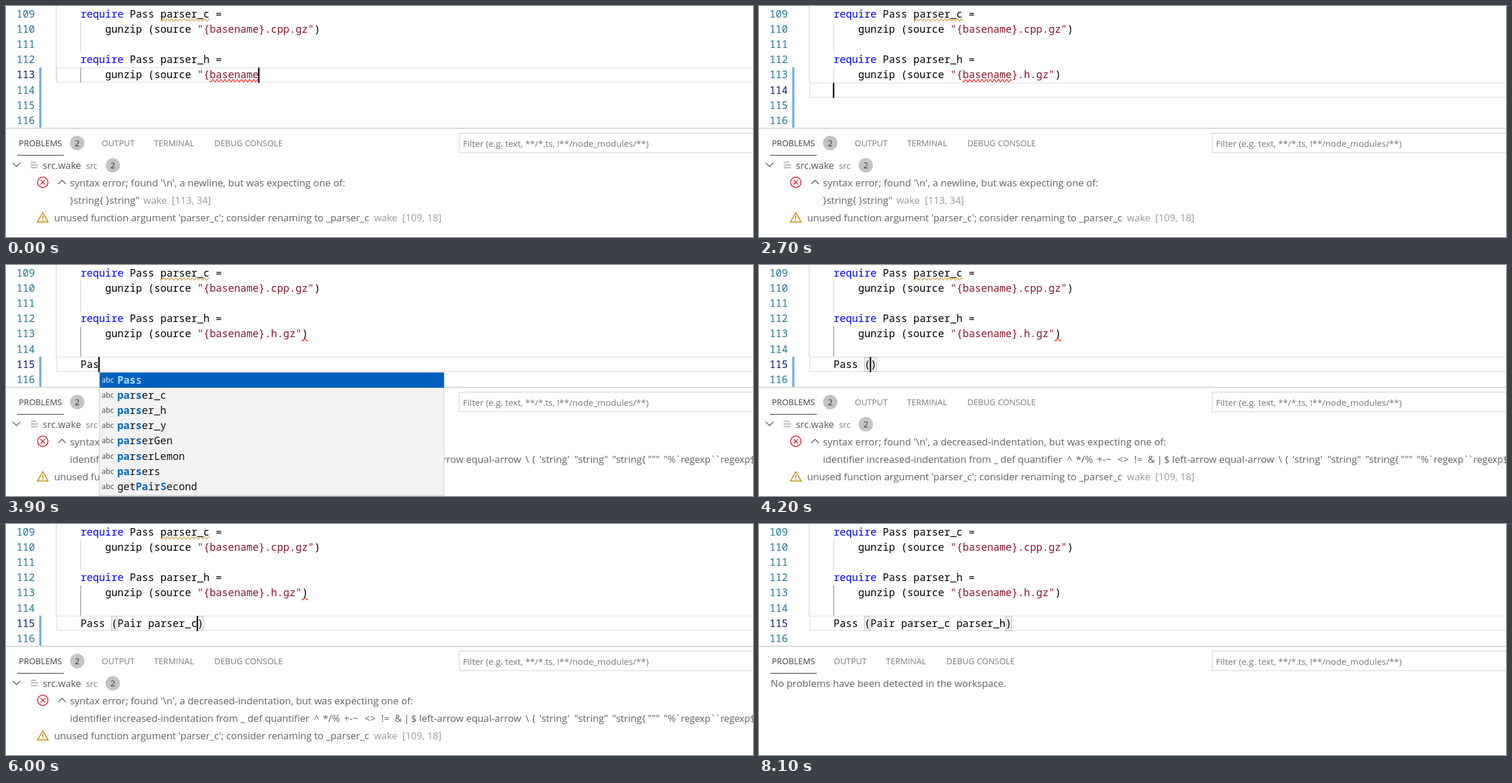
Recreate the animation shown at these times as an HTML page. Size 1280 by 397 pixels, loop 8.4 s.

```html
<!DOCTYPE html>
<html lang="en">
<head>
<meta charset="utf-8">
<title>Editor typing</title>
<style>
  html, body { margin: 0; width: 100%; height: 100%; overflow: hidden; background: #fff; }
  svg { display: block; width: 100vw; height: 100vh; }
  text { white-space: pre; font-family: "Open Sans", "Noto Sans", sans-serif; font-size: 16.75px; fill: #616161; }
  text.code { font-family: "Noto Sans Mono", "DejaVu Sans Mono", monospace; font-size: 17.55px; fill: #000; }
</style>
</head>
<body>
<svg id="stage" viewBox="0 0 1280 397" preserveAspectRatio="none"></svg>
<script>
const STEP = 300, LOOP = 8400;
const CHAR = 10.53, ROW = 26.1, LEFT = 127.8, FIRST = 109;
const stage = document.getElementById('stage');

const esc = s => s.replace(/&/g, '&amp;').replace(/</g, '&lt;').replace(/>/g, '&gt;');
const rowTop = n => 1 + (n - FIRST) * ROW;
const colX = c => LEFT + c * CHAR;

const text = (x, y, s, fill = '#616161', size = 16.75, more = '') =>
  `<text x="${x}" y="${y}" style="fill:${fill};font-size:${size}px" ${more}>${esc(s)}</text>`;
const mono = (x, y, s, fill = '#000', bold = false) =>
  `<text class="code" x="${x}" y="${y}" style="fill:${fill};font-weight:${bold ? 700 : 400}">${esc(s)}</text>`;
const rect = (x, y, w, h, fill, more = '') =>
  `<rect x="${x}" y="${y}" width="${w}" height="${h}" fill="${fill}" ${more}/>`;
const line = (d, color, width = 1.3) =>
  `<path d="${d}" fill="none" stroke="${color}" stroke-width="${width}"/>`;
const code = (n, col, s, fill) => mono(colX(col), rowTop(n) + 19, s, fill);

function squiggle(col, len, n, color) {
  let d = `M${colX(col)} ${rowTop(n) + 23}`;
  const half = 3.51;
  for (let i = 0; i < Math.round(len * CHAR / half); i++) d += `q${half / 2} ${i % 2 ? -4 : 4} ${half} 0`;
  return line(d, color, 1.2);
}

// [start ms, changed values]
const steps = [
  [0, { tail: '', last: '', row: 113, error: 'newline', popup: false, bar: 113, typing: false, blink: true }],
  [300, { tail: '}' }],
  [600, { tail: '}.' }],
  [900, { tail: '}.h' }],
  [1200, { tail: '}.h.' }],
  [1500, { tail: '}.h.g' }],
  [1800, { tail: '}.h.gz' }],
  [2100, { tail: '}.h.gz"' }],
  [2400, { tail: '}.h.gz")' }],
  [2700, { row: 114 }],
  [3000, { row: 115, bar: 115, error: 'indent' }],
  [3600, { last: 'P', typing: true }],
  [3900, { last: 'Pas', popup: true }],
  [4200, { last: 'Pass (', popup: false }],
  [4500, { last: 'Pass (Pai' }],
  [4800, { last: 'Pass (Pair ' }],
  [5100, { last: 'Pass (Pair pa' }],
  [5400, { last: 'Pass (Pair pars' }],
  [5700, { last: 'Pass (Pair parser' }],
  [6000, { last: 'Pass (Pair parser_c' }],
  [6300, { last: 'Pass (Pair parser_c ' }],
  [6600, { last: 'Pass (Pair parser_c pa' }],
  [6900, { last: 'Pass (Pair parser_c pars' }],
  [7200, { last: 'Pass (Pair parser_c parser' }],
  [7500, { last: 'Pass (Pair parser_c parser_h' }],
  [7800, { error: '', bar: 0 }],
  [8100, { blink: false }]
];
const stateAt = t => Object.assign({}, ...steps.filter(s => s[0] <= t).map(s => s[1]));

function editor(s) {
  const RED = '#86152b', KEY = '#0000ff';
  const top = rowTop(s.row);
  let out = '';

  // current line and indent guides
  out += rect(87, top + .8, 1220, ROW - 1.6, 'none', 'stroke="#e9e9e9" stroke-width="1.8"');
  const end = rowTop(s.typing ? 115 : 114);
  out += line(`M86 0V${end}`, '#d6d6d6');
  out += line(`M128 ${rowTop(110)}V${rowTop(112)}`, '#d3d3d3');
  out += line(`M128 ${rowTop(113)}V${end}`, s.typing || s.row === 113 ? '#8c8c8c' : '#d3d3d3');

  for (let n = FIRST; n <= 116; n++)
    out += mono(18, rowTop(n) + 19, String(n), n === s.row ? '#0b216f' : '#237893');
  if (s.bar) out += rect(57, rowTop(s.bar), 3.6, 209 - rowTop(s.bar), '#6bb0dd');

  for (const [n, name] of [[109, 'parser_c'], [112, 'parser_h']]) {
    out += code(n, 0, 'require', KEY) + code(n, 8, `Pass ${name} =`);
    out += code(n + 1, 4, 'gunzip (source ');
  }
  out += code(110, 19, '"{basename}.cpp.gz"', RED) + code(110, 38, ')');
  const closed = s.tail.endsWith(')');
  out += code(113, 19, '"{basename' + s.tail.replace(')', ''), RED);
  if (closed) out += code(113, 36, ')');

  const open = s.last.includes('(');
  if (open) {
    for (const col of [5, s.last.length])
      out += rect(colX(col) + .4, rowTop(115) + .8, CHAR - .8, ROW - 1.4, '#f0f2f0', 'stroke="#b9b9b9"');
  }
  out += code(115, 0, s.last + (open ? ')' : ''));

  if (s.error) out += squiggle(13, 8, 109, '#cd9731');
  if (s.error === 'newline') out += squiggle(21, 8, 113, '#e51400');
  if (s.error === 'indent') out += squiggle(36, 1, 113, '#e51400');

  const col = s.row === 113 ? 29 + s.tail.length : s.last.length;
  if (s.blink) out += rect(colX(col) - 1.2, top + .5, 2.4, ROW, '#000');
  return out;
}

const badge = (x, y) =>
  `<circle cx="${x}" cy="${y}" r="12.4" fill="#c4c4c4"/>` +
  text(x, y + 5, '2', '#333', 14.3, 'text-anchor="middle"');

function panel(s) {
  const shift = s.error ? 0 : 36;
  let out = rect(0, 209.5, 1280, 1.4, '#c8c8c8');
  out += text(22, 241, 'PROBLEMS', '#424242', 14.3) + rect(19, 256, 80, 1.2, '#424242');
  for (const [x, name] of [[164, 'OUTPUT'], [253.5, 'TERMINAL'], [357, 'DEBUG CONSOLE']])
    out += text(x - shift, 241, name, '#7b7b7b', 14.3);
  out += rect(776.5, 218.5, 520, 33.5, '#fff', 'stroke="#cecece"');
  out += text(783, 241.5, 'Filter (e.g. text, **/*.ts, !**/node_modules/**)', '#767676', 15.08);
  if (!s.error) return out + text(20, 279.5, 'No problems have been detected in the workspace.', '#616161', 16.88);
  return out + badge(122, 235.5) + problems(s.error);
}

function problems(kind) {
  const GREY = '#616161', MUTED = '#9a9a9a', AMBER = '#bf8803', ALERT = '#d0182c';
  let out = line('M11.5 269.5l6.5 6.5l6.5 -6.5', '#555');
  out += line('M43 268.5h9M43 273.3h12M43 278h11', '#a0a0a0', 1.4) + line('M43 268.5v10', '#c8c8c8', 1);
  out += text(63, 279.5, 'src.wake', '#555', 16.4) + text(137, 279.5, 'src', '#777', 14.7) + badge(183, 273.7);

  out += `<circle cx="63" cy="303" r="8.9" fill="none" stroke="${ALERT}" stroke-width="1.5"/>`;
  out += line('M59.3 299.3l7.4 7.4M66.7 299.3l-7.4 7.4', ALERT, 1.4);
  out += line('M89.5 306l6.5 -6.5l6.5 6.5', '#555');

  const found = kind === 'newline' ? 'newline' : 'decreased-indentation';
  out += text(109.5, 309.5, `syntax error; found '\\n', a ${found}, but was expecting one of:`, GREY, 16.87);
  if (kind === 'newline') {
    out += text(109.5, 340, '}string{ }string"') + text(235.5, 340, 'wake', MUTED) + text(284, 340, '[113, 34]', MUTED);
  } else {
    const parts = [
      [109.5, 'identifier increased-indentation from _ def quantifier'], [527.5, '^'], [543, '*/%'],
      [579, '+-~'], [614.5, '<>'], [643, '!='], [666, '&'], [682, '|'], [694, '$'],
      [708, 'left-arrow equal-arrow'], [890, '\\'], [902, '('], [914, "'string'"], [974, '"string"'],
      [1039, '"string{'], [1100, '"""'], [1127, '"%'], [1147, '`regexp`'], [1215, '`regexp$']
    ];
    for (const [x, word] of parts) out += text(x, 340, word, GREY, x > 1140 ? 16 : 16.75);
  }

  out += line('M63 355.2L72.2 371.3H53.8Z', AMBER, 1.5) + line('M63 360.5v5.5M63 367.3v1.9', AMBER, 1.6);
  out += text(82.5, 370.3, "unused function argument 'parser_c'; consider renaming to _parser_c");
  return out + text(630.5, 370.3, 'wake', MUTED) + text(679, 370.3, '[109, 18]', MUTED);
}

// matched letters stand between bars
const words = ['|Pas|s', '|pa|r|s|er_c', '|pa|r|s|er_h', '|pa|r|s|er_y', '|pa|r|s|erGen',
  '|pa|r|s|erLemon', '|pa|r|s|ers', 'get|Pa|ir|S|econd'];

function popup() {
  let out = rect(160, 184.5, 590.5, 211.5, '#f3f3f3', 'stroke="#c8c8c8"');
  out += rect(160.5, 185, 590, 26, '#0060c0');
  words.forEach((word, i) => {
    const y = 204 + i * ROW, hot = i === 0;
    let x = 190.7;
    out += text(164, y - 2, 'abc', hot ? '#fff' : '#424242', 12.6);
    word.split('|').forEach((part, k) => {
      const hit = k % 2 === 1;
      const fill = hit ? (hot ? '#a9dcff' : '#0066bf') : (hot ? '#fff' : '#111');
      if (part) out += mono(x, y, part, fill, hit);
      x += part.length * CHAR;
    });
  });
  return out;
}

let shown = -1;
function draw(now) {
  const step = Math.floor((now % LOOP) / STEP);
  if (step !== shown) {
    shown = step;
    const s = stateAt(step * STEP);
    stage.innerHTML = editor(s) + panel(s) + (s.popup ? popup() : '');
  }
}

const start = performance.now();
function tick() {
  draw(performance.now() - start);
  requestAnimationFrame(tick);
}
tick();
</script>
</body>
</html>
```
